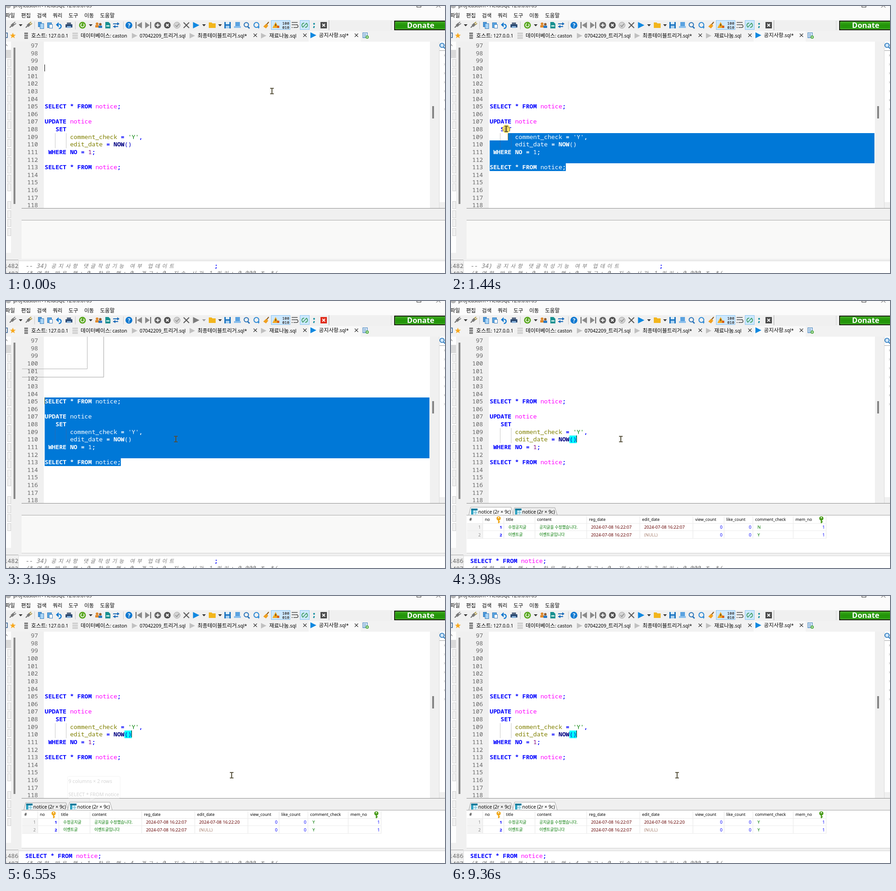
These frames come from a looping animation (959 px wide and 584 px high, 9.69 s). An HTML page with a canvas:

```html
<!DOCTYPE html>
<html lang="ko">
<head>
<meta charset="utf-8">
<title>SQL editor</title>
<style>
html, body { margin: 0; width: 100%; height: 100%; overflow: hidden; background: #f0f0f0; }
canvas { display: block; }
</style>
</head>
<body>
<canvas id="stage" width="959" height="584"></canvas>
<script>
const c = document.getElementById('stage').getContext('2d');
const LOOP = 9690;
const CELL = 7.92, ROW = 16.63, LEFT = 84.5, TOP = 78.1;
const CJK = '"Noto Sans CJK KR", "Noto Sans CJK", "Noto Sans CJK JP", sans-serif';
const SANS = '"Noto Sans", "Open Sans", sans-serif';
const MONO = '"Noto Sans Mono", "DejaVu Sans Mono", monospace';
const HANGUL = /[\uac00-\ud7a3]/;
const BLUE = '#0f78d0', GRAY = '#686868';

// ---- drawing helpers
function rect(x, y, w, h, color) { c.fillStyle = color; c.fillRect(x, y, w, h); }
function frame(x, y, w, h, color) { c.strokeStyle = color; c.lineWidth = 1; c.strokeRect(x + .5, y + .5, w - 1, h - 1); }
function path(pts) { c.beginPath(); for (let i = 0; i < pts.length; i += 2) c.lineTo(pts[i], pts[i + 1]); }
function line(pts, color, w = 1) { path(pts); c.strokeStyle = color; c.lineWidth = w; c.stroke(); }
function poly(pts, color) { path(pts); c.closePath(); c.fillStyle = color; c.fill(); }
function disc(x, y, r, color) { c.beginPath(); c.arc(x, y, r, 0, 7); c.fillStyle = color; c.fill(); }
function arc(x, y, r, color, w, a = 0, b = 6.29) { c.beginPath(); c.arc(x, y, r, a, b); c.strokeStyle = color; c.lineWidth = w; c.stroke(); }
function cross(x, y, r, color, w) { line([x - r, y - r, x + r, y + r], color, w); line([x - r, y + r, x + r, y - r], color, w); }
function play(x, y, r, color) { poly([x - r, y - r, x + r, y, x - r, y + r], color); }
function drop(x, color = '#333') { poly([x - 4, 40, x + 4, 40, x, 44.5], color); }

// Proportional text; Hangul runs are set a little larger than Latin ones.
function ui(text, x, y, size, color = '#000', { weight = '', ko = 1.13, right = false } = {}) {
  const runs = text.match(/[\uac00-\ud7a3]+|[^\uac00-\ud7a3]+/g);
  const font = s => HANGUL.test(s) ? `${weight} ${size * ko}px ${CJK}` : `${weight} ${size}px ${SANS}`;
  c.fillStyle = color;
  if (right) for (const s of runs) { c.font = font(s); x -= c.measureText(s).width; }
  for (const s of runs) {
    c.font = font(s);
    c.fillText(s, x, y);
    x += c.measureText(s).width;
  }
}

function mono(text, x, y, color, style = '') {
  c.fillStyle = color;
  for (const s of text.match(/[\uac00-\ud7a3]|[^\uac00-\ud7a3]+/g)) {
    const wide = HANGUL.test(s);
    c.font = wide ? `${style} 11.5px ${CJK}` : `${style} 13.2px ${MONO}`;
    c.fillText(s, x + (wide ? 1 : 0), y);
    x += wide ? 15.6 : s.length * CELL;
  }
}

// ---- editor content: [column, text, style]
const STYLES = {
  key: ['#0000ff', '600'], sym: ['#0000ff', '600'], par: ['#0000c8', ''], table: ['#ff00ff', ''],
  col: ['#808000', ''], str: ['#008000', ''], num: ['#800080', ''], fn: ['#000080', '600']
};
const SELECT = [[0, 'SELECT', 'key'], [7, '*', 'sym'], [9, 'FROM', 'key'], [14, 'notice', 'table'], [20, ';', 'sym']];
const CODE = {
  105: SELECT,
  107: [[0, 'UPDATE', 'key'], [7, 'notice', 'table']],
  108: [[3, 'SET', 'key']],
  109: [[7, 'comment_check', 'col'], [21, '=', 'sym'], [23, "'Y'", 'str'], [26, ',', 'sym']],
  110: [[7, 'edit_date', 'col'], [17, '=', 'sym'], [19, 'NOW', 'fn'], [22, '()', 'par']],
  111: [[1, 'WHERE', 'key'], [7, 'NO', 'key'], [10, '=', 'sym'], [12, '1', 'num'], [13, ';', 'sym']],
  113: SELECT
};
const rowY = n => TOP + (n - 97) * ROW;
const colX = n => LEFT + n * CELL;
function tokens(list, x, y, color) {
  for (const [col, text, style] of list) {
    const [own, weight] = STYLES[style];
    mono(text, x + col * CELL, y, color || own, weight);
  }
}
function code(color) {
  for (const n in CODE) tokens(CODE[n], LEFT, rowY(+n) + 13, color);
  for (const x of [107, 131]) rect(x, Math.round(rowY(109)), 1, 33, color ? '#2a6cb4' : '#c9c9c9');
}

// ---- pointer motion: time, x, y, eased
const MOVES = [
  [0, 581, 186], [150, 581, 186], [900, 254, 353, 1], [1100, 254, 353], [1360, 125, 287], [1440, 121, 269],
  [1770, 45, 219], [2030, 45, 219], [2370, 371, 302, 1], [4380, 371, 302], [5080, 198, 463, 1],
  [6180, 198, 463], [6540, 493, 392, 1], [LOOP, 494, 392]
];
function pointer(t) {
  let i = 1;
  while (i < MOVES.length - 1 && t > MOVES[i][0]) i++;
  const a = MOVES[i - 1], b = MOVES[i];
  let u = Math.min(1, Math.max(0, (t - a[0]) / (b[0] - a[0])));
  if (b[3]) u = u * u * (3 - 2 * u);
  return [a[1] + (b[1] - a[1]) * u, a[2] + (b[2] - a[2]) * u];
}
const within = (t, a, b) => t >= a && t < b;
const BLINKS = [300, 830, 1100, 2370, 2900, 4590, 5120, 5680, 6230, 6760, 7290, 7820, 8350, 8810, 9360];
function caretOn(t) {
  if (within(t, 1100, 2370)) return true;
  const n = BLINKS.filter(b => b <= t).length;
  return t < 1100 ? n % 2 === 0 : n % 2 === 1;
}
function selectionStart(t) {
  const [x, y] = pointer(Math.min(t - 80, 1770));
  const row = Math.min(113, Math.max(105, 97 + Math.floor((y - TOP) / ROW)));
  const last = (CODE[row] || []).at(-1);
  const end = last ? last[0] + last[1].length : 0;
  return [row, Math.min(end, Math.max(0, Math.round((x - LEFT) / CELL)))];
}

// ---- window parts
function menuAndTitle() {
  rect(0, 0, 959, 31, '#fbfbfb');
  disc(5, -1, 6, '#b4b4b4');
  ui('proj\\caston\\ - HeidiSQL 12.0.0.6765', 16, 3, 10.4, '#222');
  frame(897, -6, 10, 9, '#333');
  cross(944.5, -1, 4.5, '#333', 1);
  ['파일', '편집', '검색', '쿼리', '도구', '이동', '도움말'].forEach((s, i) =>
    ui(s, -1.5 + i * 34.5, 25, 11.5, '#000', { ko: 1 }));
}

function plug(x, tip) {
  line([x - 6, 47, x - 2, 44], '#555', 1.6);
  poly([x - 4, 42, x + 1, 37, x + 5, 41, x, 46], '#777');
  line([x + 2, 38, x + 6, 35], tip, 1.6);
  line([x + 4, 41, x + 8, 38], tip, 1.6);
}
function sheet(x, y, w, h, fill) { rect(x, y, w, h, fill); frame(x, y, w, h, '#3c7ebc'); }
function toggled(x, w) { rect(x, 31, w, 21, '#cce8ff'); frame(x, 31, w, 21, '#8cc4ee'); }
function bits(text, y) { c.font = `bold 8.5px ${MONO}`; c.fillStyle = '#4a4a4a'; c.fillText(text, 603.5, y); }

function toolbar(busy) {
  rect(0, 31, 959, 24, '#f0f0f0');
  plug(14, '#777'); drop(32); plug(49, '#a89030');
  for (const x of [62, 151, 256]) rect(x, 34, 1, 17, '#c8c8c8');
  sheet(70, 35, 8, 11, '#4a9ade'); sheet(74, 38, 9, 12, '#a8d4f6');
  sheet(90, 36, 10, 12, '#5aa6e2'); sheet(94, 40, 8, 9, '#fff');
  poly([109, 41, 115, 35.5, 115, 46.5], BLUE); arc(116, 44.5, 4.5, BLUE, 2.4, -1.6, 1.7);
  rect(133, 36, 9, 4, '#5e6e86'); rect(130, 40, 15, 7, '#2c4a72'); rect(133, 44, 9, 4, '#8ab4dc');
  disc(167, 42, 7.5, '#5aa820'); arc(167, 42, 3.7, '#fff', 1.7, -.9, 4.4); drop(185);
  disc(199, 39, 3, '#e08a2c'); rect(195, 42, 8, 5, '#e08a2c');
  disc(206, 40, 2.8, '#8a5a30'); rect(202, 43, 8, 5, '#2c7ac4');
  poly([217, 35, 224, 35, 228, 39, 228, 49, 217, 49], '#189090'); rect(219, 42, 7, 3, '#bfe6e0');
  for (const y of [39, 45]) line([234, y, 245, y], '#1a6ab8', 2);
  poly([243, 35.5, 248, 39, 243, 42.5], '#1a6ab8'); poly([239, 41.5, 234, 45, 239, 48.5], '#1a6ab8');
  disc(268.5, 42, 7.5, BLUE); ui('?', 266, 46.5, 12, '#fff', { weight: 'bold' });
  rect(283, 35, 2, 14, GRAY); poly([297, 35, 286, 42, 297, 49], '#8a8a8a');
  rect(315, 35, 2, 14, GRAY); poly([304, 35, 314, 42, 304, 49], '#8a8a8a');
  disc(331.5, 42, 7.3, GRAY); line([327.5, 42, 335.5, 42], '#fff', 2); line([331.5, 38, 331.5, 46], '#fff', 2);
  disc(352.5, 42, 7.3, '#505050'); cross(352.5, 42, 2.8, '#fff', 2);
  disc(373.5, 42, 7, '#d4d4d4'); arc(373.5, 42, 6.8, '#a4a4a4', 1); line([370, 42, 373, 45, 378, 39], '#8a8a8a', 1.6);
  cross(394, 42, 6, '#5c5c5c', 2.2);
  play(415.5, 42, 7, busy ? '#7c7c7c' : '#1088e0'); drop(432.5, busy ? '#999' : '#333');
  poly([443, 36, 449, 36, 451, 38, 458, 38, 458, 48, 443, 48], '#f2b51c'); drop(467.5);
  rect(477, 35, 14, 14, '#1c74c0'); rect(480, 35, 8, 5, '#d8ecfa'); rect(480, 43, 8, 6, '#a8d0f0');
  rect(501, 35, 10, 9, '#5aa2e0'); rect(498, 44, 15, 4, '#8cc0ec');
  arc(525, 41, 4.8, '#2470b8', 2); line([528, 45, 532, 49], '#2470b8', 2.6);
  arc(547, 41.5, 5.4, '#2c88d4', 2); poly([549, 45, 554, 45, 552, 50], '#2c88d4');
  line([569, 41, 574, 35], '#8a5a20', 2); poly([568, 39, 573, 43, 568, 49, 562, 45], '#f0a020');
  toggled(579, 42); toggled(642, 21);
  poly([589, 35, 596, 48, 582, 48], '#f4a81c'); rect(588.5, 39, 1.5, 5, '#333'); rect(592, 43, 5, 5, '#d86018');
  bits('100', 40.5); bits('010', 49.5);
  for (const y of [36, 41]) line([624, y, 637, y], '#444', 1.4);
  arc(635, 44, 3, '#444', 1.4, -1.6, 1.6); line([628, 47, 635, 47], '#444', 1.4); line([624, 47, 626, 47], '#444', 1.4);
  arc(651, 42, 4.6, '#3a9a5a', 1.8, 2.2, 4.8); arc(654, 42, 4.6, '#3a9a5a', 1.8, -1, 1.7); line([648, 47, 657, 37], '#3a9a5a', 1.6);
  disc(673, 39, 2, '#1890a0'); line([673.5, 44, 672, 48], '#1890a0', 2.8);
  rect(687, 35, 14, 14, busy ? '#e02c1c' : '#4a4a4a'); cross(694, 42, 3, '#fff', 1.8);
  rect(705, 31, 1, 22, '#a8a8a8');
  for (let y = 33; y < 52; y += 3) rect(841, y, 1, 1, '#999');
  const g = c.createLinearGradient(0, 34, 0, 51);
  g.addColorStop(0, '#3aa81c'); g.addColorStop(.5, '#219408'); g.addColorStop(1, '#2a9c10');
  rect(848, 32, 111, 21, '#101c08'); rect(850, 34, 109, 17, '#5cba3c'); rect(851, 35, 108, 15, g);
  ui('Donate', 876, 48, 16.4, '#fff', { weight: 'bold' });
}

function fileTabs() {
  rect(0, 55, 959, 23, '#f2f2f2');
  rect(661, 55, 114, 23, '#f9f9f9');
  line([0, 59, 3, 59, 3, 69, 0, 69], '#2c5c94', 1.5);
  const star = [];
  for (let i = 0; i < 10; i++) {
    const r = i % 2 ? 2.8 : 6.8, a = i * Math.PI / 5 - Math.PI / 2;
    star.push(15 + r * Math.cos(a), 65 + r * Math.sin(a));
  }
  poly(star, '#f8a81c');
  for (const y of [58, 63, 68]) { rect(40, y, 8, 4, '#858585'); rect(145, y, 12, 4, '#d2d2d2'); }
  for (const x of [281, 407, 563]) play(x, 65, 6, '#c0c0c0');
  play(671.5, 64, 6.5, '#1088e0');
  ui('호스트: 127.0.0.1', 55, 69, 10.3);
  ui('데이터베이스: caston', 163, 69, 10.3);
  ui('07042209_트리거.sql', 292, 69, 10.3);
  ui('최종테이블트리거.sql*', 418.5, 69, 10.3);
  ui('재료나눔.sql', 575, 69, 10.3);
  ui('공지사항.sql*', 683.5, 68, 10.3);
  for (const x of [544.5, 653, 765.5]) cross(x, 64, 3.7, '#222', 1.2);
  sheet(779, 58, 11, 12, '#e4f0fa');
  for (const y of [61, 64, 67]) rect(781, y, 6, 1, '#3c7ebc');
  disc(789, 68, 3.5, '#48a838'); line([787, 68, 791, 68], '#fff'); line([789, 66, 789, 70], '#fff');
}

function sidePanels() {
  rect(0, 78, 11, 462, '#fdfdfd');
  line([0, 84, 3, 87.5], '#444');
  rect(0, 96, 11, 18, '#d9d9d9');
  for (let i = 0; i < 20; i++) {
    if (i === 15) continue;
    const y = Math.round(116 + i * 19.45);
    rect(3, y, 8, 17, '#f1f1f1'); frame(3, y, 8, 17, '#d2d2d2');
  }
  rect(16.5, 91, 4, 342, '#858585');
  rect(946, 78, 13, 351, '#fff'); rect(946, 78, 1, 364, '#dadada'); rect(947, 97, 12, 1, '#a0a0a0');
  arc(952.5, 86, 4.6, '#2f7cc0', 2); disc(952.5, 86, 3.5, '#cfe6f8'); line([956, 90, 959, 93], '#2f7cc0', 2.4);
  for (let i = 0; i < 7; i++) line([957, 106 + i * 19.6, 959, 108 + i * 19.6, 957, 110 + i * 19.6], '#aaa');
}

function editor(t) {
  rect(83, 78, 843, 364, '#fff');
  rect(82, 78, 1, 364, '#f6f6f6');
  rect(931, 219, 4, 27, '#858585');
  for (let n = 97; n <= 118; n++) mono(String(n), 70 - String(n).length * CELL, rowY(n) + 13, '#686868');
  const selecting = within(t, 1180, 3880);
  if (t >= 3880) rect(colX(22), rowY(110), 2 * CELL, ROW, '#00ffff');
  code();
  let caret = t < 1100 ? [100, 0] : t < 1180 ? [113, 21] : [110, 24];
  if (selecting) {
    const [row, col] = caret = selectionStart(t);
    c.save();
    c.beginPath();
    for (let n = row; n <= 113; n++) {
      const x = n === row ? colX(col) : LEFT, end = n === 113 ? colX(21) : 925;
      c.rect(x, Math.round(rowY(n)), Math.max(0, end - x), Math.round(rowY(n + 1)) - Math.round(rowY(n)));
    }
    c.clip();
    rect(83, 200, 843, 170, '#0078d7');
    code('#fff');
    c.restore();
  }
  if (caretOn(t)) rect(Math.floor(colX(caret[1])), Math.round(rowY(caret[0])), 1, 15, selecting ? '#8a7a28' : '#000');
  rect(34, 442, 925, 1, '#8c8c8c');
}

function resultTab(x, active) {
  const top = active ? 451 : 452;
  const pts = [x, 468, x + 4, top, x + 92, top, x + 97, 468];
  poly(pts, active ? '#fcfcfc' : '#ededed');
  line(pts, '#a4a4a4');
  rect(x + 5, 454, 14, 13, '#d4eef6');
  for (const k of [9, 14]) rect(x + k, 458, 1, 9, '#6cbcd4');
  rect(x + 9, 462, 10, 1, '#6cbcd4');
  rect(x + 5, 454, 14, 4, '#127c9c'); rect(x + 5, 458, 4, 9, '#2aa0c0');
  ui('notice (2r × 9c)', x + 20.5, 465, 10.4);
}
function keyIcon(x, color) {
  disc(x, 475.5, 4.6, color); disc(x, 474, 1.4, '#fff'); rect(x - 1.2, 479, 2.6, 7, color); rect(x + 1, 482, 2, 2, color);
}
function results(t) {
  const second = t >= 6080;
  rect(34, 469, 925, 82, '#fff');
  resultTab(second ? 39 : 135, false);
  rect(34, 468, 925, 1, '#a4a4a4');
  resultTab(second ? 135 : 39, true);
  rect(35, 487, 34, 32, '#f4f4f4');
  for (const x of [69, 115, 183, 296, 412, 528, 596, 659, 747, 819]) rect(x, 470, 1, 49, '#e6e6e6');
  for (const y of [486, 502, 519]) rect(35, y, 785, 1, '#ececec');
  const heads = [['#', 40], ['no', 74], ['title', 120], ['content', 188], ['reg_date', 301.5], ['edit_date', 417.5],
    ['view_count', 533.5], ['like_count', 601.5], ['comment_check', 664.5], ['mem_no', 752.5]];
  for (const [s, x] of heads) ui(s, x, 481, 8.8);
  keyIcon(104, '#f0a81c'); keyIcon(809, '#4a9c1c');
  const stamp = '2024-07-08 16:22:', red = '#640000', green = '#007800';
  const rows = [
    ['1', '수정공지글', '공지글을 수정했습니다.', stamp + (second ? '20' : '07'), second ? 'Y' : 'N'],
    ['2', '이벤트글', '이벤트글입니다', '(NULL)', 'Y']
  ];
  rows.forEach(([no, title, text, edited, check], i) => {
    const y = 498 + i * 16.6, right = { right: true };
    ui(no, 65, y, 9, '#888', right);
    ui(no, 111.5, y, 9.3, '#0000ff', { right: true, weight: 'bold' });
    ui(title, 125, y - .5, 8.6, green, { ko: 1 });
    ui(text, 193, y - .5, 8.6, green, { ko: 1 });
    ui(stamp + '07', 306, y, 9.4, red);
    ui(edited, 422, y, 9.4, i ? '#a88070' : red);
    for (const x of [593, 656]) ui('0', x, y, 9.3, '#0000ff', right);
    ui(check, 669.5, y, 9.2, green);
    ui('1', 816.5, y, 9.3, '#0000ff', right);
  });
}

function lowerPane(t) {
  if (t >= 3330) results(t);
  else {
    rect(34, 468, 925, 1, '#a8a8a8');
    rect(34, 469, 925, t < 3120 ? 84 : 82, '#f9f9f8');
  }
  if (t >= 3120) rect(34, 551, 925, 1, '#d0d0d0');
  rect(0, 555, 27, 1, '#a8a8a8'); rect(27, 556, 1, 28, '#dcdcdc');
  rect(28, 558, 931, 26, '#fff'); rect(28, 557, 931, 1, '#d8d8d8');
}
function log(t) {
  const done = t >= 3330;
  const n = done ? 1486 : 1482;
  mono(String(n), -4.5, 573, '#686868'); mono(String(n + 1), -4.5, 589.5, '#686868');
  if (done) tokens(SELECT, 42, 573);
  else {
    mono('-- 34) 공지사항 댓글작성기능 여부 업데이트', 42, 573, '#787878', 'italic');
    mono(';', 455, 573, '#0000ff', '600');
  }
  const [hit, found, count] = done ? [1, 4, 3] : [0, 0, 1];
  mono(`/* 영향 받은 행: ${hit}  찾은 행: ${found}  경고: 0  지속 시간 ${count} 쿼리: 0.000 초 */`, 42, 589, '#787878', 'italic');
}

function hint(t) {
  const alpha = Math.min((t - 5380) / 100, (6620 - t) / 280, 1);
  if (alpha <= 0) return;
  c.save();
  c.globalAlpha = alpha;
  c.beginPath(); c.roundRect(134.5, 394.5, 115, 48, 3);
  c.fillStyle = '#fff'; c.fill(); c.strokeStyle = '#d0d0d0'; c.lineWidth = 1; c.stroke();
  poly([183, 442, 195, 442, 183, 451], '#fff'); line([183, 443, 183, 451, 195, 443], '#b8b8b8');
  ui('9 columns × 2 rows', 136.5, 409, 10.6, '#575757');
  ui('SELECT * FROM notice', 136.5, 437.5, 10.6, '#575757');
  c.restore();
}

function cursor(t) {
  const [x, y] = pointer(t);
  if (within(t, 1080, 1800) || within(t, 3850, 3960) || within(t, 6010, 6140)) disc(x, y, 9, 'rgba(255,225,30,.7)');
  if (y > 442) {
    poly([x, y - 1, x, y + 11, x + 2.8, y + 8.4, x + 5, y + 13, x + 7, y + 12, x + 5, y + 7.8, x + 8.6, y + 7.6], '#d8b818');
    c.strokeStyle = '#2c2810'; c.lineWidth = 1; c.stroke();
    return;
  }
  const ink = '#55503a';
  line([x, y - 6, x, y + 6], ink, 2);
  for (const k of [-6, 6]) line([x - 4, y + k, x + 4, y + k], ink, 1.8);
}

function draw(t) {
  rect(0, 0, 959, 584, '#f0f0f0');
  menuAndTitle();
  toolbar(within(t, 3120, 3330));
  fileTabs();
  sidePanels();
  editor(t);
  lowerPane(t);
  log(t);
  if (within(t, 3190, 3330)) {
    line([35, 148.5, 177.5, 148.5, 177.5, 78], '#b4b4b4');
    line([35, 166.5, 213.5, 166.5, 213.5, 78], '#a4a4a4');
  }
  hint(t);
  cursor(t);
}

const start = performance.now();
function tick() {
  draw((performance.now() - start) % LOOP);
  requestAnimationFrame(tick);
}
tick();
</script>
</body>
</html>
```
